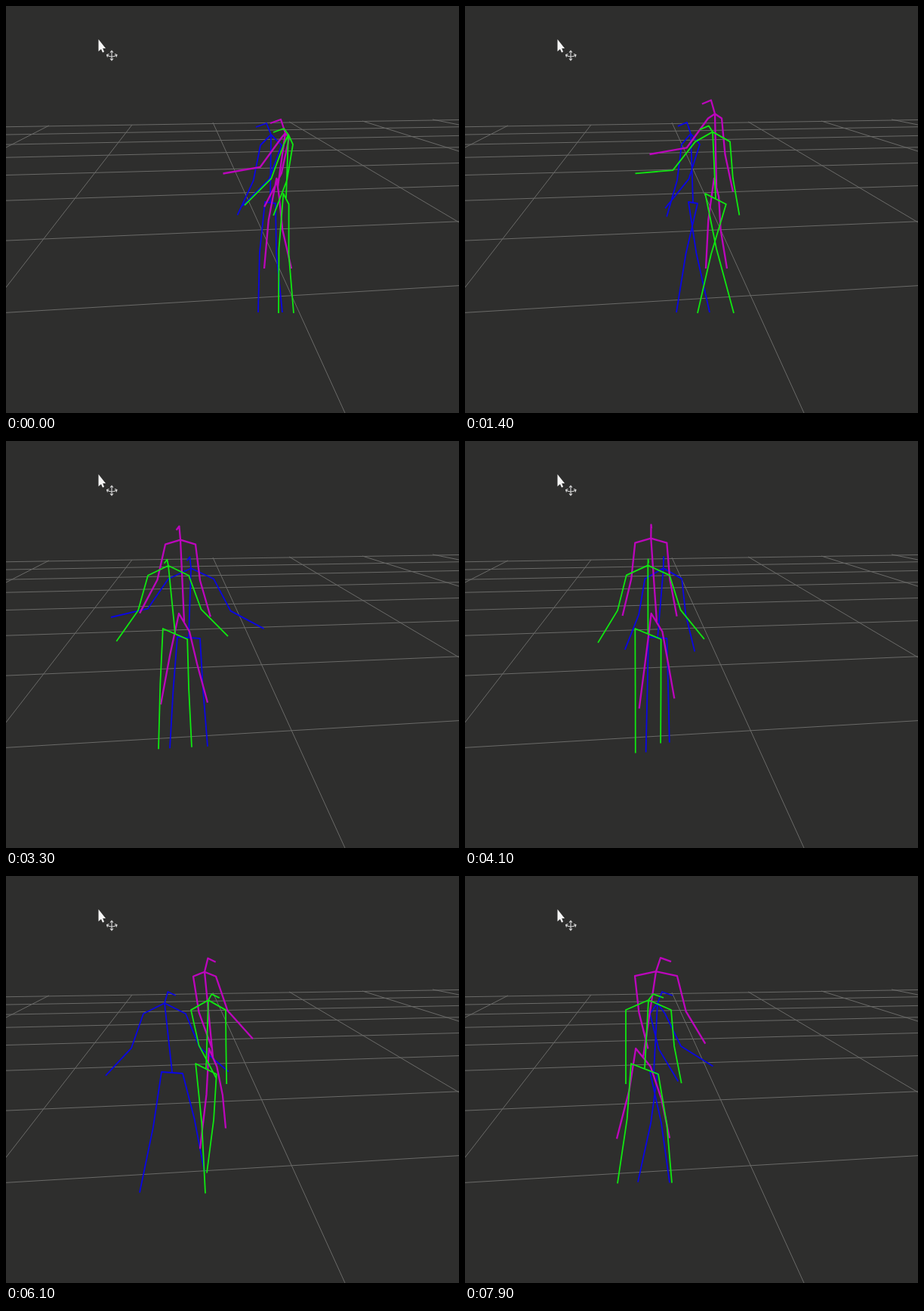
An HTML page that plays this animation: 600x538 px, repeating every 8 s.

```html
<!DOCTYPE html>
<html lang="en">
<head>
<meta charset="utf-8">
<title>Walking skeletons</title>
<style>
  html, body { margin: 0; width: 100%; height: 100%; overflow: hidden; background: #2e2e2d; }
  svg { display: block; width: 100%; height: 100%; }
  path { fill: none; stroke-linejoin: round; }
</style>
</head>
<body>
<svg viewBox="0 0 600 538">
  <path id="grid" stroke="#6a6a68" stroke-width="1"/>
  <path id="blue" stroke="#0a06e4" stroke-width="1.8"/>
  <path id="magenta" stroke="#bc06bc" stroke-width="2.3"/>
  <path id="green" stroke="#10e810" stroke-width="1.8"/>
  <g id="cursor">
    <path d="M122.5 44V60L126 57L128 61.5L130 60.6L128.2 56H132Z" style="fill:#f4f4f4"/>
    <path d="M140 60V71M134 65Q140 69 146.5 65M138 61.5L140 59L142 61.5M138 69.5L140 72L142 69.5M136.5 63.5L133.5 64.5L134.5 67.5M144 63.5L147 64.5L146 67.5" stroke="#d8d8d8" stroke-width="1.1"/>
  </g>
</svg>
<script>
const LOOP = 8000, STEP = 100;
const $ = id => document.getElementById(id);

// Perspective floor: rows recede evenly towards the horizon.
const HORIZON = 72;
const row = (near, gap, k) => HORIZON + 1 / (near + gap * k);
let floor = '';
for (let k = 0; k < 8; k++) {
  floor += `M0 ${row(.003, .0012, k)}L600 ${row(.00336, .00134, k)}`;
}
floor += 'M449 538L274 154M0 372L167 157M0 187L57 158M600 286L375 153M600 192L472 152M600 157L565 150';
$('grid').setAttribute('d', floor);

// Body heights in stage units; tilt raises the left hip, sink lowers the neck at the start.
// Each key: time, neck x, pelvis x, half shoulder width, half stride, left and right arm angle.
const walkers = {
  blue: {
    head: 15, neck: 168, shoulder: 14, hip: 260, hipWidth: .5, tilt: 1, foot: 405, sink: 2,
    keys: [
      [0, 351, 350, 14, 16, -25, -45],
      [1400, 299, 302, 12, -22, -16, -39],
      [2100, 228, 230, 21, 31, -21, -15],
      [2700, 250, 247, 30, 26, -80, 95],
      [3300, 245, 242, 30, 25, -77, 62],
      [4900, 274, 264, 20, 10, 24, -21],
      [6100, 210, 220, 28, 43, -43, 50],
      [7200, 178, 182, 29, 23, -70, 58],
      [7900, 255, 250, 10, -21, 31, 58],
    ],
  },
  magenta: {
    head: 18, neck: 126, shoulder: 6, hip: 240, hipWidth: .35, tilt: 12, foot: 347, sink: 42,
    keys: [
      [0, 370, 360, 5, 18, -80, -27],
      [1400, 331, 333, 9, 14, -80, 12],
      [2100, 290, 299, 5, 34, -38, -15],
      [3300, 231, 236, 20, 31, -28, 16],
      [4900, 267, 278, 20, 16, 2, 6],
      [6100, 263, 274, 15, 17, 20, 42],
      [7900, 253, 236, 28, 35, 14, 31],
    ],
  },
  green: {
    head: 8, neck: 164, shoulder: 13, hip: 255, hipWidth: .6, tilt: 7, foot: 406, sink: 6,
    keys: [
      [0, 374, 371, 6, 10, -45, -21],
      [1400, 328, 332, 23, -24, -85, 10],
      [2100, 297, 298, 11, -5, -6, -68],
      [3300, 215, 224, 27, 22, -35, 45],
      [4900, 277, 268, 28, 8, -20, 20],
      [6100, 268, 265, 23, 1, 28, 1],
      [7900, 243, 238, 30, 36, 0, 11],
    ],
  },
};

// Cubic Hermite between keys, with softened tangents.
function sample(keys, time) {
  const last = keys.length - 1;
  if (time >= keys[last][0]) return keys[last];
  const i = keys.findIndex(k => k[0] > time) - 1;
  const a = keys[i], b = keys[i + 1];
  const span = b[0] - a[0], u = (time - a[0]) / span;
  const slope = (n, c) => {
    const p = keys[Math.max(0, n - 1)], q = keys[Math.min(last, n + 1)];
    return .7 * span * (q[c] - p[c]) / (q[0] - p[0]);
  };
  const ease = u * u * (3 - 2 * u), leave = u * (1 - u) ** 2, arrive = u * u * (u - 1);
  return a.map((v, c) =>
    v + (b[c] - v) * ease + slope(i, c) * leave + slope(i + 1, c) * arrive);
}

const bone = ([x, y], length, degrees) => {
  const angle = degrees * Math.PI / 180;
  return [x + length * Math.sin(angle), y + length * Math.cos(angle)];
};

// The forearm follows the arm angle, the upper arm only part of it.
function arm(shoulder, angle) {
  const elbow = bone(shoulder, 48, angle * .45);
  return [shoulder, elbow, bone(elbow, 50, angle)];
}

// The knee bends a little in the direction of walking.
function leg(hip, foot, look) {
  const knee = [hip[0] + (foot[0] - hip[0]) * .46 + look * .15, hip[1] + (foot[1] - hip[1]) * .46];
  return [hip, knee, foot];
}

const line = points => 'M' + points.map(p => p.map(v => v.toFixed(1)).join(' ')).join('L');

function skeleton(body, time) {
  const [, x, pelvis, half, stride, left, right] = sample(body.keys, time);
  const look = -20 * Math.cos(Math.PI * time / LOOP);
  const depth = 18 * Math.exp(-(((time - 5400) / 1300) ** 2));
  const neckY = body.neck + body.sink * Math.exp(-time / 1500);
  const neck = [x, neckY];
  const face = [x + look * .3, neckY - body.head];
  const nose = [x + look, face[1] + 5];

  const side = (sign, angle) => ({
    arm: arm([x + sign * half, neckY + body.shoulder], angle),
    leg: leg([pelvis + sign * half * body.hipWidth, body.hip + sign * body.tilt],
             [pelvis + sign * stride, body.foot - sign * depth], look),
  });
  const l = side(-1, left), r = side(1, right);
  return line([nose, face, neck, [pelvis, body.hip - 1]])
    + line([...l.arm.reverse(), neck, ...r.arm])
    + line([...l.leg.reverse(), ...r.leg]);
}

function draw(time) {
  for (const name in walkers) {
    $(name).setAttribute('d', skeleton(walkers[name], time));
  }
}

let start;
function tick(now) {
  start ??= now;
  draw(Math.floor(((now - start) % LOOP) / STEP) * STEP);
  requestAnimationFrame(tick);
}
draw(0);
requestAnimationFrame(tick);
</script>
</body>
</html>
```
